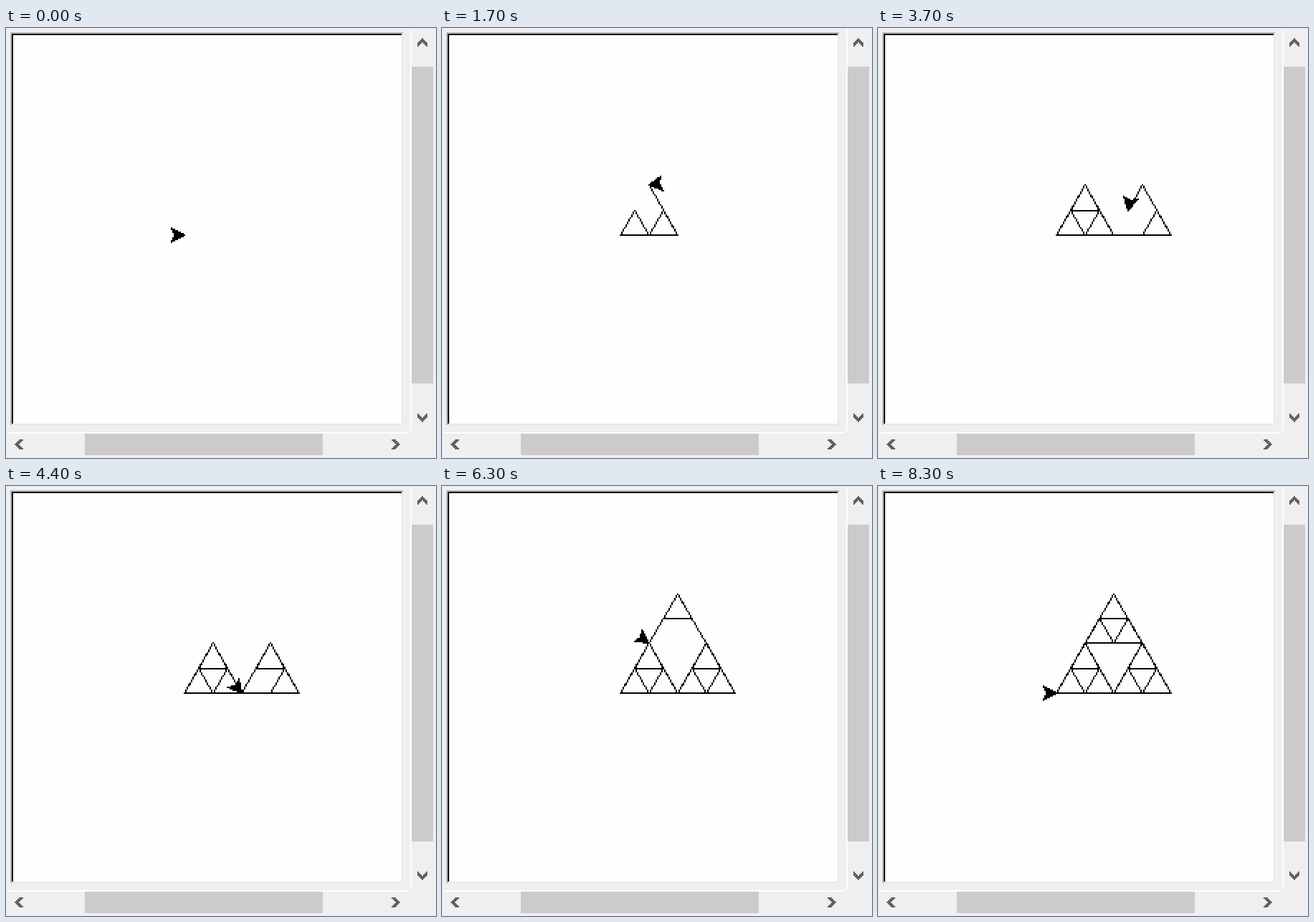
Write an HTML page with a canvas that moves like this. It is 600x600 px and loops after 8500 ms.

```html
<!DOCTYPE html>
<html lang="en">
<head>
<meta charset="utf-8">
<title>Turtle triangles</title>
<style>
html, body { margin: 0; width: 100%; height: 100%; overflow: hidden; background: #efeef0; }
canvas { display: block; width: 600px; height: 600px; image-rendering: pixelated; }
</style>
</head>
<body>
<canvas id="stage" width="300" height="300"></canvas>
<script>
const ctx = document.getElementById('stage').getContext('2d');
const LOOP = 8500, TICK = 100, RAD = Math.PI / 180;
const SPEED = 3, HOP = 3 * 1.1 ** SPEED * SPEED, SPIN = 3 * SPEED;
const ARROW = [[0, 0], [-9, 5], [-7, 0], [-9, -5]];

// Every small step of the turtle, with the number of corners passed so far
let x = 124, y = 144, heading = 0;
const corners = [[x, y]], steps = [];
const record = () => steps.push({ x, y, heading, passed: corners.length });

function forward(length) {
  const hops = 1 + Math.floor(length / HOP);
  const x0 = x, y0 = y;
  for (let i = 1; i <= hops; i++) {
    x = x0 + length * i / hops * Math.cos(heading * RAD);
    y = y0 - length * i / hops * Math.sin(heading * RAD);
    record();
  }
  corners.push([x, y]);
}

function left(angle) {
  const turns = 1 + Math.floor(angle / SPIN), start = heading;
  for (let i = 1; i <= turns; i++) {
    heading = start + angle * i / turns;
    record();
  }
}

function sierpinski(length, depth) {
  for (let i = 0; i < 3; i++) {
    if (depth) sierpinski(length / 2, depth - 1);
    forward(length);
    left(120);
  }
}

record();
sierpinski(80, 2);

function rect(color, x, y, w, h) {
  ctx.fillStyle = color;
  ctx.fillRect(x, y, w, h);
}

// Hard-edged line, one pixel wide
function line([ax, ay], [bx, by]) {
  ax = Math.round(ax); ay = Math.round(ay);
  bx = Math.round(bx); by = Math.round(by);
  const dx = Math.abs(bx - ax), dy = Math.abs(by - ay);
  const sx = Math.sign(bx - ax), sy = Math.sign(by - ay);
  let err = dx - dy;
  for (;;) {
    ctx.fillRect(ax, ay, 1, 1);
    if (ax === bx && ay === by) return;
    const e = 2 * err;
    if (e > -dy) { err -= dy; ax += sx; }
    if (e < dx) { err += dx; ay += sy; }
  }
}

function turtle({ x, y, heading }) {
  const c = Math.cos(heading * RAD), s = Math.sin(heading * RAD);
  const points = ARROW.map(([u, v]) => [Math.round(x + u * c - v * s), Math.round(y - u * s - v * c)]);
  const shape = new Path2D();
  points.forEach(p => shape.lineTo(...p));
  shape.closePath();
  points.forEach((p, i) => line(p, points[(i + 1) % 4]));
  const cx = Math.round(x), cy = Math.round(y);
  for (let j = cy - 12; j <= cy + 12; j++)
    for (let i = cx - 12; i <= cx + 12; i++)
      if (ctx.isPointInPath(shape, i, j)) ctx.fillRect(i, j, 1, 1);
}

function chevron(x, y, dx, dy) {
  for (let i = -3; i <= 3; i++) {
    const a = Math.abs(i);
    for (let k = a; k < a + 3; k++)
      rect('#606060', x + (dx ? -dx * k : i), y + (dy ? -dy * k : i), 1, 1);
  }
}

function windowFrame() {
  rect('#efeef0', 0, 0, 300, 300);
  rect('#b4b3b5', 3, 3, 274, 274);
  rect('#e8e7e9', 4, 4, 273, 273);
  rect('#101010', 4, 4, 272, 272);
  rect('#fefefe', 5, 5, 271, 271);
  rect('#fefefe', 282, 1, 1, 280);
  rect('#fefefe', 1, 282, 280, 1);
  rect('#cccacc', 283, 27, 15, 221);
  rect('#cccacc', 55, 283, 166, 15);
  chevron(290, 7, 0, -1);
  chevron(290, 274, 0, 1);
  chevron(6, 290, -1, 0);
  chevron(274, 290, 1, 0);
}

function draw(now) {
  const tick = Math.floor(now % LOOP / TICK) - 1;
  const index = Math.floor(8.11 * tick - 2.8);
  const state = steps[Math.max(0, Math.min(steps.length - 1, index))];
  windowFrame();
  ctx.fillStyle = '#000';
  const path = [...corners.slice(0, state.passed), [state.x, state.y]];
  for (let i = 1; i < path.length; i++) line(path[i - 1], path[i]);
  turtle(state);
}

const start = performance.now();
function frame() {
  draw(performance.now() - start);
  requestAnimationFrame(frame);
}
frame();
</script>
</body>
</html>
```
